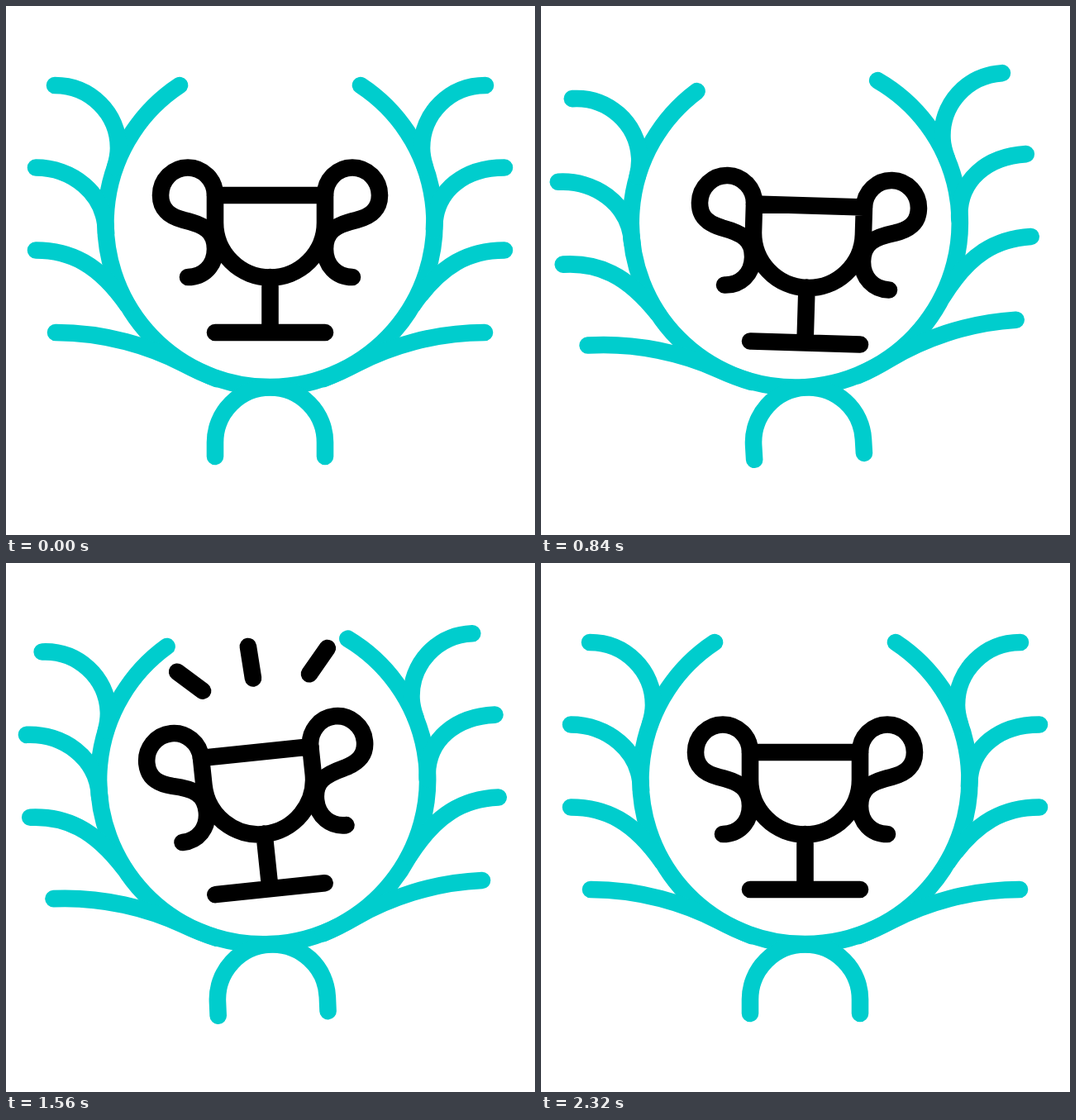
Recreate the animation shown at these times as an HTML page. Size 640 px wide and 640 px high, loop 2480 ms.

```html
<!DOCTYPE html>
<html lang="en">
<head>
<meta charset="utf-8">
<title>Trophy</title>
<style>
  html, body { margin: 0; width: 100%; height: 100%; overflow: hidden; background: #fff; }
  svg { display: block; width: 100%; height: 100%; }
  g { fill: none; stroke-width: 20.6; stroke-linecap: round; stroke-linejoin: round; }
  #wreath { stroke: #00cdcd; }
  #cup, #rays { stroke: #000; }
</style>
</head>
<body>
<svg viewBox="0 0 640 640">
  <defs>
    <path id="branches" d="M59 96C102 96 136 130 136 172Q136 182 132 195
      M36 295.500C78 295.500 112 312 147 362
      M60 395C120 395 175 412 215 433Q236 444 255 451"/>
    <path id="handle" d="M253 229A33 33.500 0 0 0 187 229C187 248 200 255 215 259
      C240 265 253 272 253 294C253 314 239 328 220 328"/>
  </defs>
  <g id="wreath">
    <path d="M210 96A199 199 0 1 0 429 96"/>
    <use href="#branches"/>
    <use href="#branches" transform="matrix(-1 0 0 1 639 0)"/>
    <path d="M36 195.500C78 195.500 121 225 121 275M603 195.500C557 195.500 518 221 518 270"/>
    <path d="M253 545V528A66.500 66.500 0 0 1 386 528V545"/>
  </g>
  <g id="rays" transform="rotate(-9 322 272)">
    <path pathLength="1" d="M257.500 143L230.500 115.500"/>
    <path pathLength="1" d="M320 137.500V98.500"/>
    <path pathLength="1" d="M388 143L414.500 115.500"/>
  </g>
  <g id="cup">
    <use href="#handle"/>
    <use href="#handle" transform="matrix(-1 0 0 1 639 0)"/>
    <path d="M253 229V262A66.500 66.500 0 0 0 386 262V229ZM319.500 328V395M253 395H386"/>
  </g>
</svg>
<script>
  const LOOP = 2480, STEP = 40, END = 2320;
  const $ = id => document.getElementById(id);
  const wreath = $('wreath'), cup = $('cup'), rays = $('rays');

  // Keys are [time in ms, value]
  const swing = [[0, 0], [360, 6], [720, -6], [1080, 4], [1440, -4], [1800, 2], [2160, 0]];
  const tilt = [[0, 0], [500, -9.1], [1010, 5.5], [1560, -6], [2020, 0]];
  const lift = [[0, 0], [740, 17], [1220, -23.6], [1780, 11], [2200, 0]];
  const rayTip = [[1340, 0], [1520, 1]];
  const rayTail = [[1580, 0], [1740, 1]];

  function at(keys, t) {
    if (t <= keys[0][0]) return keys[0][1];
    for (let i = 1; i < keys.length; i++) {
      const [t0, a] = keys[i - 1], [t1, b] = keys[i];
      if (t < t1) {
        const x = (t - t0) / (t1 - t0);
        return a + (b - a) * x * x * (3 - 2 * x);
      }
    }
    return keys[keys.length - 1][1];
  }

  function draw(now) {
    const t = Math.min(END, Math.floor(now % LOOP / STEP) * STEP);
    wreath.setAttribute('transform', `rotate(${at(swing, t)} 319.5 460)`);
    cup.setAttribute('transform', `translate(0 ${at(lift, t)}) rotate(${at(tilt, t)} 319.5 395)`);

    const tip = at(rayTip, t), tail = at(rayTail, t);
    rays.style.visibility = tip > tail ? 'visible' : 'hidden';
    rays.style.strokeDasharray = `${tip - tail} 3`;
    rays.style.strokeDashoffset = -tail;
  }

  const start = performance.now();
  function tick() {
    draw(performance.now() - start);
    requestAnimationFrame(tick);
  }
  tick();
</script>
</body>
</html>
```
